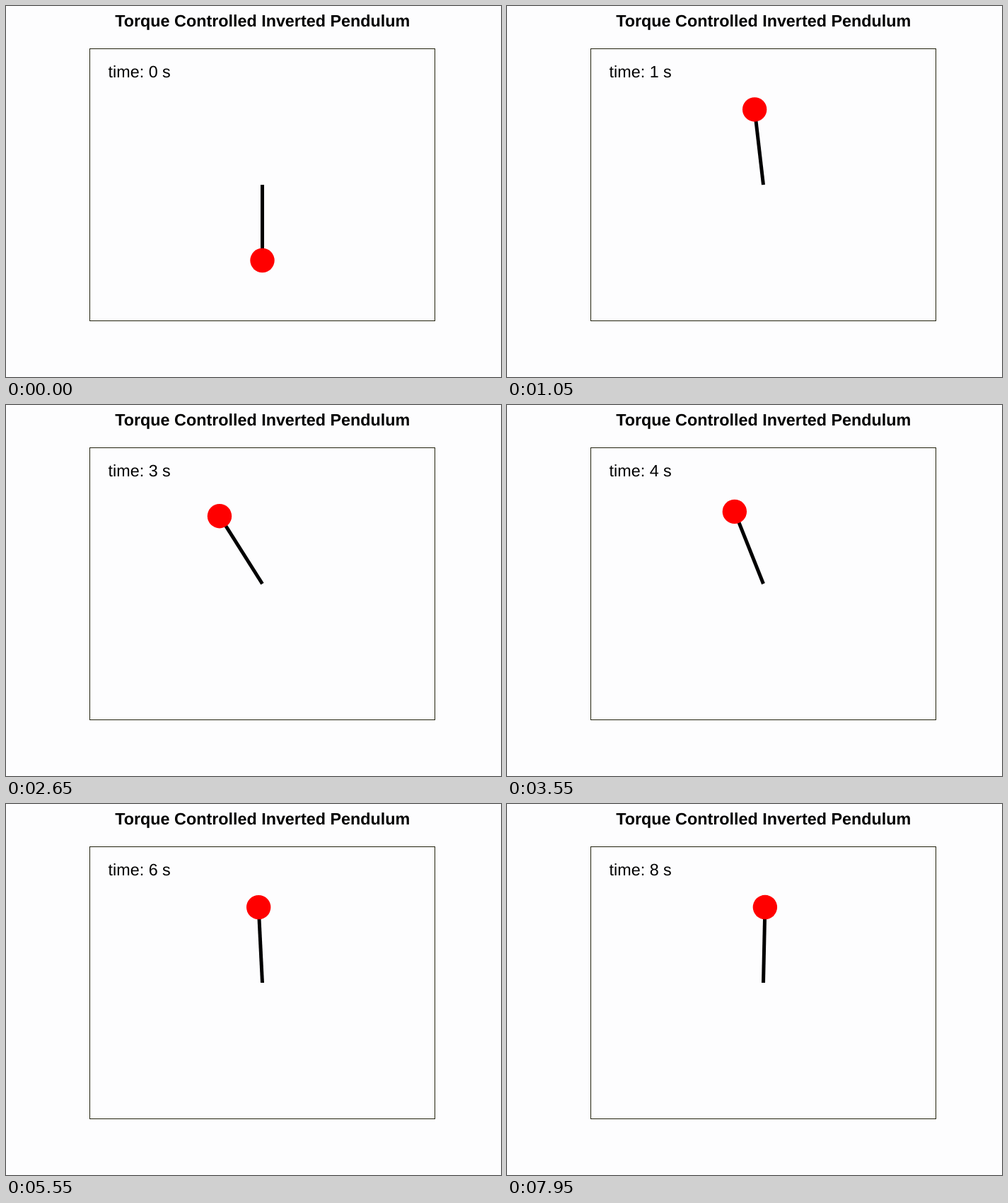
Write an HTML page that moves like this. It is 700 px wide and 525 px high and loops after 8000 ms.

```html
<!DOCTYPE html>
<html lang="en">
<head>
<meta charset="utf-8">
<title>Inverted Pendulum</title>
<style>
  html, body { margin: 0; width: 100%; height: 100%; overflow: hidden; background: #fdfdfe; }
  svg { display: block; width: 700px; height: 525px; }
  text { font: 23.33px "Liberation Sans", Arial, sans-serif; text-rendering: geometricPrecision; }
  .title { font-weight: bold; text-anchor: middle; }
</style>
</head>
<body>
<svg viewBox="0 0 700 525">
  <text class="title" x="362.7" y="29">Torque Controlled Inverted Pendulum</text>
  <rect x="118.5" y="60.5" width="488" height="385" fill="none" stroke="#22220c"/>
  <text id="clock" x="144.6" y="101">time: 0 s</text>
  <line id="rod" x1="362.5" y1="253" stroke="#000" stroke-width="5"/>
  <circle id="bob" r="17.2" fill="#f00"/>
</svg>
<script>
const PIVOT = { x: 362.5, y: 253 };
const UNIT = { x: 135.8, y: 107 };   // pixels per metre on each axis
const FRAME_MS = 50, FRAMES = 160, SUBSTEPS = 200;
const GRAVITY = 9.81, KP = 15.41, KI = 2.99, KD = 5.25;

// PID torque swings the pendulum from hanging (pi) to upright (0).
function simulate() {
  const dt = FRAME_MS / 1000 / SUBSTEPS;
  const angles = [];
  let angle = Math.PI, speed = 0, integral = 0;
  for (let frame = 0; frame < FRAMES; frame++) {
    angles.push(angle);
    for (let i = 0; i < SUBSTEPS; i++) {
      const torque = -KP * angle - KI * integral - KD * speed;
      speed += (GRAVITY * Math.sin(angle) + torque) * dt;
      integral += angle * dt;
      angle += speed * dt;
    }
  }
  return angles;
}

const angles = simulate();
const [clock, rod, bob] = ["clock", "rod", "bob"].map(id => document.getElementById(id));

function setAttributes(node, values) {
  for (const name in values) node.setAttribute(name, values[name]);
}

function draw(ms) {
  const frame = Math.floor(ms / FRAME_MS) % FRAMES;
  const x = PIVOT.x + UNIT.x * Math.sin(angles[frame]);
  const y = PIVOT.y - UNIT.y * Math.cos(angles[frame]);
  setAttributes(rod, { x2: x, y2: y });
  setAttributes(bob, { cx: x, cy: y });
  clock.textContent = `time: ${Math.round(frame * FRAME_MS / 1000)} s`;
}

const start = performance.now();
function tick() {
  draw(performance.now() - start);
  requestAnimationFrame(tick);
}
tick();
</script>
</body>
</html>
```
